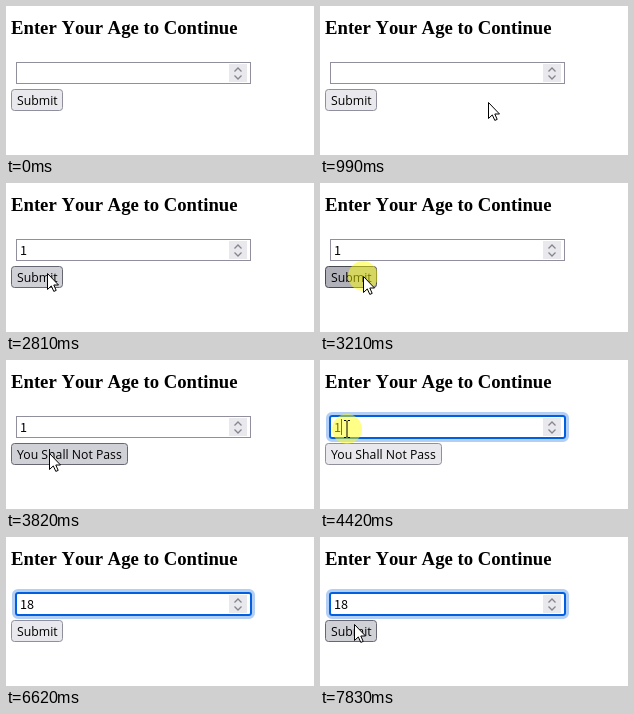
Animation of 308 by 149 pixels, one loop 8000 ms. Source, as an HTML page:

```html
<!DOCTYPE html>
<html lang="en">
<meta charset="utf-8">
<title>Age form</title>
<style>
  html, body { margin: 0; width: 100%; height: 100%; overflow: hidden; background: #fff; }
  svg { display: block; width: 100vw; height: 100vh; }
  text { white-space: pre; }
  .title { font: bold 18.72px "Liberation Serif", serif; font-kerning: none; }
  #label { font: 500 12.25px "Open Sans", sans-serif; }
  #value { font: 12.7px "Noto Sans CJK JP", "Noto Sans CJK SC", sans-serif; }
  .chevron { fill: none; stroke: #85858f; stroke-width: 1.3; }
</style>
<svg viewBox="0 0 308 149">
  <text class="title" x="5" y="28">Enter Your Age to Continue</text>

  <g id="focus" fill="none">
    <rect x="7.5" y="53.5" width="240" height="27" rx="4.5" stroke="#b3cff5" stroke-width="3"/>
    <rect x="10" y="56" width="235" height="22" rx="2" stroke="#0060df" stroke-width="2"/>
  </g>
  <rect id="field" x="10.5" y="56.5" width="234" height="21" fill="none"/>
  <rect id="selection" x="14" y="59" width="7" height="16" fill="#0078d7"/>
  <text id="value" x="14" y="72"></text>
  <rect id="caret" y="59" width="1" height="16"/>

  <rect x="223" y="58" width="18" height="18" fill="#e9e9ed"/>
  <rect id="spinUp" x="223" y="58" width="18" height="9" fill="#b1b1b9"/>
  <path class="chevron" d="M228.5 65.5l3.5-3.5 3.5 3.5M228.5 69.5l3.5 3.5 3.5-3.5"/>

  <rect id="button" x="5.5" y="83.5" height="21" rx="3"/>
  <text id="label" x="11" y="99"></text>

  <g id="pointer">
    <circle id="press" r="15" fill="#ff0" opacity=".47"/>
    <path id="arrow" d="M.5 .5V16.5L4.3 12.9 6.8 18.4 9.2 17.4 6.8 12H11.5Z" fill="#fff" stroke="#000"/>
    <path id="beam" d="M-3 -8.5H-1L0 -7.5 1 -8.5H3M0 -7.5V7.5M-3 8.5H-1L0 7.5 1 8.5H3" fill="none" stroke="#000"/>
  </g>
</svg>
<script>
  const LOOP = 8000;
  const TICK = 200.8; // the screen refreshes in coarse steps
  const LEAD = 19;
  const $ = id => document.getElementById(id);
  const set = (id, attrs) => {
    for (const name in attrs) $(id).setAttribute(name, attrs[name]);
  };
  const show = (id, on) => set(id, { visibility: on ? "visible" : "hidden" });
  const mix = (a, b, p) => a + (b - a) * p;
  const smooth = p => p * p * (3 - 2 * p);

  // Stops of the pointer, in ticks
  const stops = [
    { at: 1, x: 52, y: 136 },
    { at: 3, x: 44, y: 95 },
    { at: 6, x: 211, y: 97 },
    { at: 8, x: 233, y: 63 },
    { at: 10, x: 233, y: 63 },
    { at: 14, x: 41, y: 90 },
    { at: 15, x: 43, y: 93 },
    { at: 19, x: 43, y: 93 },
    { at: 22, x: 27, y: 69 },
    { at: 24, x: 1, y: 70 },
    { at: 39, x: 34, y: 87 }
  ];

  function pointerAt(tick) {
    const next = stops.find(stop => stop.at >= tick);
    const last = stops.findLast(stop => stop.at <= tick) || next;
    const p = smooth((tick - last.at) / (next.at - last.at || 1));
    return [mix(last.x, next.x, p), mix(last.y, next.y, p)];
  }

  function render(t) {
    const tick = Math.min(39, Math.floor((t + LEAD) / TICK));
    const within = (from, to) => tick >= from && tick < to;
    const present = within(1, 25) || tick >= 37;
    const [x, y] = pointerAt(tick);
    const over = (left, top, right, bottom) =>
      present && x >= left && x < right && y >= top && y < bottom;

    const denied = within(17, 30);
    const dragging = within(22, 25);
    const pressed = dragging || tick === 10 || tick === 16;
    const focused = tick >= 22;
    const selected = within(23, 30);
    const width = denied ? 116 : 51;
    const onField = over(10, 56, 245, 78);
    const onButton = !dragging && over(5, 83, 6 + width, 105);
    const state = onButton ? (pressed ? 2 : 1) : 0;

    show("focus", focused);
    show("field", !focused);
    set("field", { stroke: onField ? "#676774" : "#8f8f9d" });
    show("selection", selected);
    $("value").textContent = tick < 11 ? "" : tick < 31 ? "1" : "18";
    set("value", { fill: selected ? "#fff" : "#000" });
    show("caret", tick === 22 || within(30, 33) || within(36, 38));
    set("caret", { x: tick < 31 ? 21 : 28 });

    show("spinUp", over(223, 58, 241, 67));
    set("spinUp", { fill: pressed ? "#b1b1b9" : "#d0d0d7" });
    set("button", {
      width,
      fill: ["#e9e9ed", "#d0d0d7", "#b1b1b9"][state],
      stroke: ["#8f8f9d", "#676774", "#484851"][state]
    });
    $("label").textContent = denied ? "You Shall Not Pass" : "Submit";

    const beam = dragging || (onField && x < 223);
    set("pointer", { transform: `translate(${Math.round(x)} ${Math.round(y)})` });
    show("press", present && pressed);
    show("arrow", present && !beam);
    show("beam", present && beam);
  }

  const start = performance.now();
  (function frame() {
    render((performance.now() - start) % LOOP);
    requestAnimationFrame(frame);
  })();
</script>
</html>
```
